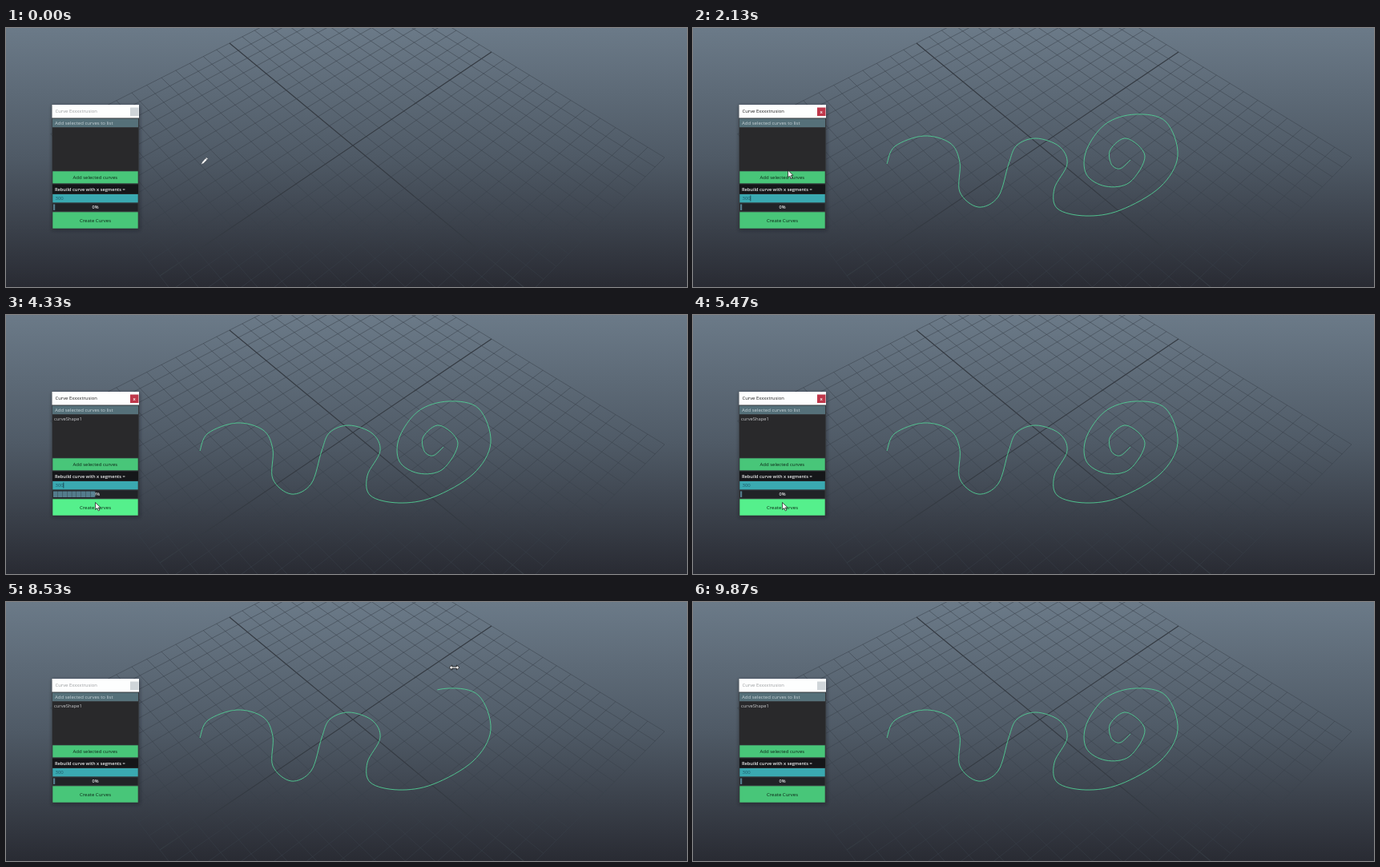
An HTML page that plays this animation: 850 by 324 pixels, repeating every 9.99 s.

```html
<!DOCTYPE html>
<html lang="en">
<head>
<meta charset="utf-8">
<title>Curve tool demo</title>
<style>
html, body { margin: 0; height: 100%; overflow: hidden; background: #2a2c34; }
svg { display: block; width: 850px; height: 324px; }
text { font: 500 6px "Open Sans", "Noto Sans", sans-serif; }
.bold { font-weight: 600; }
.mid { text-anchor: middle; }
</style>
</head>
<body>
<svg viewBox="0 0 850 324">
  <defs>
    <linearGradient id="sky" x2="0" y2="1">
      <stop stop-color="#6b7a88"/>
      <stop offset=".5" stop-color="#4f5a66"/>
      <stop offset="1" stop-color="#292b33"/>
    </linearGradient>
    <filter id="soft" x="-10%" y="-10%" width="120%" height="120%"><feGaussianBlur stdDeviation="2"/></filter>
  </defs>
  <rect width="850" height="324" fill="url(#sky)"/>
  <path id="grid" fill="none" stroke="#39414a" stroke-opacity=".65" stroke-width=".8"/>
  <path id="axes" fill="none" stroke="#343a42" stroke-width="1.1"/>
  <path id="curve" fill="none" stroke="#52cf95" stroke-width=".9"/>

  <rect x="57.5" y="97" width="109.5" height="156" fill="#14181d" opacity=".45" filter="url(#soft)"/>
  <rect x="57.5" y="96" width="108.5" height="155.5" fill="#35393c"/>
  <rect x="57.5" y="96" width="108.5" height="16.5" fill="#fdfefe"/>
  <text id="title" x="61.5" y="106.3" style="font-size:5.85px">Curve Exxxxtrusion</text>
  <rect id="close" x="155" y="99.5" width="10.5" height="10.5"/>
  <text id="cross" class="bold mid" x="160.2" y="106.8" fill="#fff">x</text>

  <rect x="58" y="113.5" width="107" height="10.5" fill="#557079"/>
  <text x="61" y="121" fill="#c5d0d5">Add selected curves to list</text>
  <rect x="58" y="125" width="107" height="53.5" fill="#29292b"/>
  <text id="item" x="60" y="131.6" fill="#c9cbcd" style="font-size:5.8px">curveShape1</text>

  <rect x="58.3" y="179.3" width="106.4" height="15" fill="#48c679"/>
  <text class="mid" x="111.3" y="189.2" fill="#0c2416">Add selected curves</text>
  <rect x="58" y="195.5" width="107" height="12" fill="#151619"/>
  <text class="bold" x="61" y="203.8" fill="#eceeee" style="font-size:5.65px">Rebuild curve with x segments =</text>
  <rect x="58.3" y="208" width="106.4" height="10.3" fill="#3aa9b1"/>
  <text x="61.5" y="215.4" fill="#1d5868">300</text>
  <path id="caret" d="M71.8 209.5v7" stroke="#123" stroke-width=".7"/>
  <rect x="58.5" y="219.5" width="106" height="9.5" fill="#212327"/>
  <text id="percent" class="bold mid" x="111.5" y="226.3" fill="#e2e4e5" style="font-size:5.6px"></text>
  <path id="bar" fill="none" stroke="#5a8797" stroke-opacity=".9" stroke-width="7.5" stroke-dasharray="5.5 .3"/>
  <rect id="create" x="58.3" y="230.3" width="106.4" height="20.4"/>
  <text class="mid" x="111.5" y="242.8" fill="#0c2416">Create Curves</text>

  <g id="pencil">
    <path d="M0 0L2-3.4 7-9.3 9.3-7.2 3.4-1.6Z" fill="#fff" stroke="#3a424b" stroke-width=".6"/>
    <path d="M6-8.2L8.2-6" stroke="#444c55" stroke-width=".7"/>
  </g>
  <path id="arrow" d="M0 0V9L2.2 7 3.8 10.4 5.3 9.7 3.8 6.4H6.6Z" fill="#fff" stroke="#111" stroke-width=".7"/>
  <path id="drag" d="M-6.3 0L-2.8-3V-1H2.8V-3L6.3 0 2.8 3V1H-2.8V3Z" fill="#fff" stroke="#111" stroke-width=".8"/>
</svg>
<script>
const $ = id => document.getElementById(id);
const show = (id, on) => $(id).style.display = on ? "" : "none";
const clamp = v => Math.max(0, Math.min(1, v));
const ease = (t, from, to) => { const v = clamp((t - from) / (to - from)); return v * v * (3 - 2 * v); };
const mix = (a, b, f) => a.map((v, i) => v + (b[i] - v) * f);

// Ground plane in perspective: u and v run from -1 to 1.
function ground(u, v) {
  const w = 1 + .1795 * u + .1641 * v;
  return `${(433 - 103.9 * u + 272.4 * v) / w} ${(147 - 124.6 * u - 112.1 * v) / w}`;
}
const cross = s => `M${ground(s, -1)}L${ground(s, 1)}M${ground(-1, s)}L${ground(1, s)}`;
let lines = "";
for (let i = -12; i <= 12; i++) if (i) lines += cross(i / 12);
$("grid").setAttribute("d", lines);
$("axes").setAttribute("d", cross(0));

// Smooth path through key points (Catmull-Rom): a wave, then a spiral.
function smooth(points) {
  return points.slice(1).reduce((d, q, i) => {
    const p = points[i], o = points[i - 1] || p, r = points[i + 2] || q;
    const c1 = p.map((v, k) => v + (q[k] - o[k]) / 6);
    const c2 = q.map((v, k) => v - (r[k] - p[k]) / 6);
    return `${d}C${c1} ${c2} ${q}`;
  }, "M" + points[0]);
}
const wave = "242,170 252,148 288,135 321,144 333,168 333,205 356,224 381,211 394,170 404,147 428,138 457,148 467,170 451,201 455,226 490,235";
const spiral = "533,228 583,199 605,160 590,117 552,108 515,120 491,153 491,183 515,198 545,193 564,160 541,138 521,152 522,170 533,176 546,165";
const curve = $("curve");
curve.setAttribute("d", smooth(`${wave} ${spiral}`.split(" ").map(p => p.split(",").map(Number))));
const total = curve.getTotalLength();

// Pointer stops
const end = [546, 165], addButton = [118.5, 178], createButton = [111.5, 234.5];

function toPanel(t) {
  let pos = mix(end, [17, 240], ease(t, 1130, 1470));
  pos = mix(pos, addButton, ease(t, 1470, 1730));
  pos = mix(pos, [114, 261], ease(t, 2200, 2500));
  pos = mix(pos, createButton, ease(t, 2500, 2870));
  return mix(pos, [278, 267], ease(t, 5470, 5670));
}

// Swings left and right, entering from the top and leaving at the corner.
function dragging(t) {
  const swing = .5 - .5 * Math.cos(2 * Math.PI * (t - 7661) / 1263);
  const pos = mix([695, 60], [464.5 + 135.5 * swing, 50 + .00375 * t], ease(t, 6860, 7030));
  return mix(pos, [798, 318], ease(t, 9556, 9800));
}

function draw(now) {
  const t = Math.floor((now % 9990 + 4) / 66.6) * 66.6; // 15 pictures a second
  let part = clamp((t - 30) / 1030), kind = "pencil", pos;
  if (t < 1130) {
    const p = curve.getPointAtLength(part * total);
    pos = [p.x + 1, p.y + 1];
  } else if (t < 5720) {
    pos = toPanel(t);
    if (pos[0] > 58 && pos[0] < 166 && pos[1] > 96 && pos[1] < 251) kind = "arrow";
  } else if (t > 6855 && t < 9850) {
    pos = dragging(t);
    kind = "drag";
    part = clamp((pos[0] - 464.5) / 135.5);
  } else kind = "";
  for (const id of ["pencil", "arrow", "drag"]) show(id, id === kind);
  if (kind) $(kind).setAttribute("transform", `translate(${pos})`);
  show("curve", part > 0);
  curve.setAttribute("stroke-dasharray", `${part * total} ${total + 9}`);

  const active = t > 1590 && t < 5990;
  $("title").setAttribute("fill", active ? "#1c1c1c" : "#9a9d9f");
  $("close").setAttribute("fill", active ? "#bf384b" : "#cfd5d9");
  show("cross", active);
  show("item", t > 2260);
  show("caret", t > 1590 && t < 2860 || t > 3590 && t < 4990);

  const done = t < 4320 || t > 5320 ? 0 : Math.min(100, Math.round(50 + (t - 4330) * .15));
  $("percent").textContent = done + "%";
  $("bar").setAttribute("d", `M59 224.2H${59 + Math.max(2.2, done * 1.05)}`);
  const hover = t > 2790 && t < 5590, pressed = t > 3590 && t < 3660;
  $("create").setAttribute("fill", hover && !pressed ? "#55f08c" : "#48c679");
}

function loop() {
  draw(performance.now());
  requestAnimationFrame(loop);
}
loop();
</script>
</body>
</html>
```
